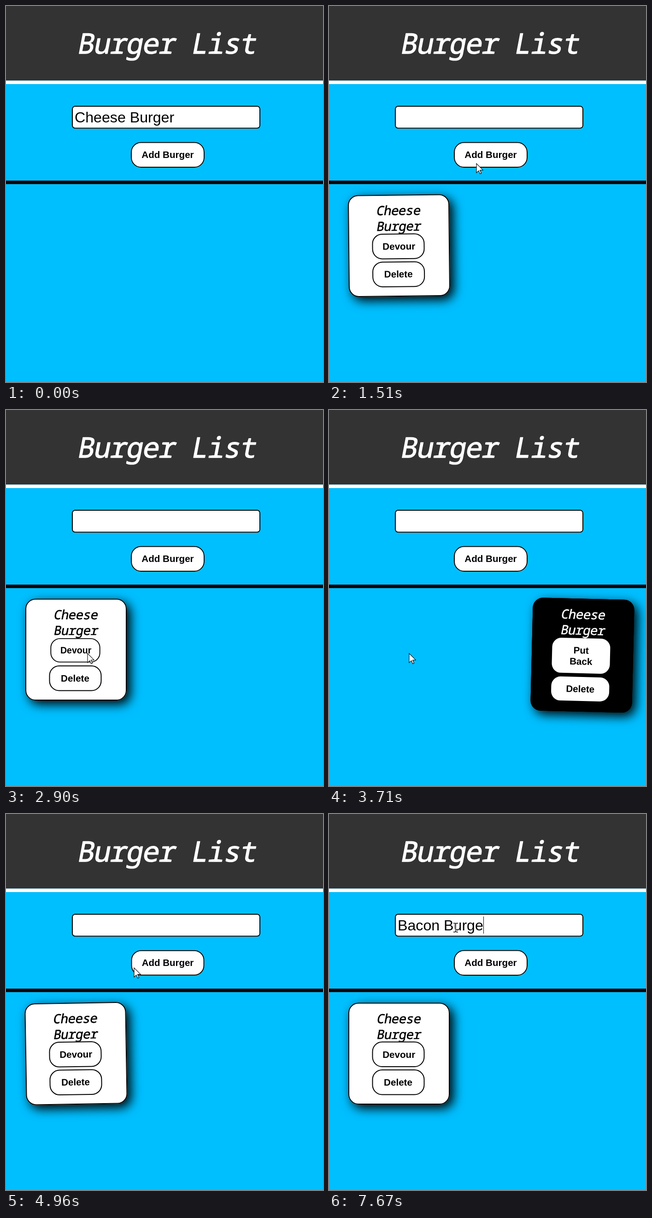
Write an HTML page with a canvas that moves like this. It is 688 px wide and 814 px high and loops after 8000 ms.

```html
<!DOCTYPE html>
<html lang="en">
<head>
<meta charset="utf-8">
<title>Burger List</title>
<style>
  html, body { margin: 0; width: 100%; height: 100%; overflow: hidden; background: #00bfff; }
  canvas { display: block; width: 688px; height: 814px; }
</style>
</head>
<body>
<canvas id="stage"></canvas>
<script>
const W = 688, H = 814, LOOP = 8000;
const SANS = '"Liberation Sans", Arial, sans-serif';
const MONO = '"Noto Sans Mono", "DejaVu Sans Mono", monospace';
const canvas = document.getElementById('stage');
const ctx = canvas.getContext('2d');
const dpr = window.devicePixelRatio || 1;
canvas.width = W * dpr;
canvas.height = H * dpr;

// moments at which the page reloads
const ADDED = 1510, DEVOURED = 3710, RETURNED = 4880;
const SETTLE = 350, HOVER = 210, SHRINK = 0.05;

// pointer trips; sag bows the trip downwards
const origin = { x: 444, y: 800 };
const trips = [
  { from: 180, to: 960, x: 286, y: 318 },
  { from: 1060, to: 1270, x: 320, y: 341 },
  { from: 1560, to: 1890, x: 267, y: 631 },
  { from: 2390, to: 2900, x: 177, y: 527 },
  { from: 3700, to: 3710, x: 174, y: 527 },
  { from: 3810, to: 4490, x: 527, y: 533, sag: 171 },
  { from: 4700, to: 4960, x: 278, y: 333 },
  { from: 4960, to: 5500, x: 275, y: 246 }
];

// typing comes in bursts at a steady pace
const PACE = 76;
const bursts = [['Bacon', 6320], [' ', 6800], ['B', 7020], ['ur', 7200], ['ger', 7520]];

const clamp = v => Math.max(0, Math.min(1, v));
const ramp = (t, from, len) => clamp((t - from) / len);
const smooth = p => p * p * (3 - 2 * p);
const hover = (t, arrive) => 1 - SHRINK * ramp(t, arrive - HOVER, HOVER);
const tilt = (t, from, angle) => angle * (1 - ramp(t, from, SETTLE));

function typedAt(t) {
  return bursts.map(([part, from]) =>
    t < from ? '' : part.slice(0, 1 + Math.floor((t - from) / PACE))).join('');
}

function pointerAt(t) {
  if (t < trips[0].from) return null;
  let { x, y } = origin;
  for (const trip of trips) {
    if (t < trip.from) break;
    const p = smooth(ramp(t, trip.from, trip.to - trip.from));
    x += (trip.x - x) * p;
    y += (trip.y - y) * p + (trip.sag || 0) * 4 * p * (1 - p);
  }
  return [x, y];
}

function box(x, y, w, h, r, fill, border) {
  ctx.beginPath();
  ctx.roundRect(x, y, w, h, r);
  ctx.fillStyle = fill;
  ctx.fill();
  if (!border) return;
  ctx.beginPath();
  ctx.roundRect(x + 1, y + 1, w - 2, h - 2, r - 1);
  ctx.lineWidth = 2;
  ctx.strokeStyle = '#000';
  ctx.stroke();
}

function label(text, x, y, font, color = '#000') {
  ctx.font = font;
  ctx.fillStyle = color;
  ctx.fillText(text, x, y);
}

// slanted monospace, thickened by an outline to a medium weight
function slanted(text, x, y, size, color) {
  ctx.save();
  ctx.translate(x, y);
  ctx.transform(1, 0, -0.19, 1, 0, 0);
  ctx.textAlign = 'center';
  ctx.letterSpacing = -size * 0.0216 + 'px';
  label(text, 0, 0, `${size}px ${MONO}`, color);
  ctx.lineWidth = size * 0.022;
  ctx.lineJoin = 'round';
  ctx.strokeStyle = color;
  ctx.strokeText(text, 0, 0);
  ctx.restore();
}

// lines: [text, centre x, baseline]
function button(x, y, w, h, border, scale, lines) {
  const cx = x + w / 2, cy = y + h / 2;
  ctx.save();
  ctx.translate(cx, cy);
  ctx.scale(scale, scale);
  ctx.translate(-cx, -cy);
  box(x, y, w, h, border ? 22 : 20, '#fff', border);
  ctx.textAlign = 'center';
  for (const [text, tx, ty] of lines) label(text, tx, ty, `bold 20.6px ${SANS}`);
  ctx.restore();
}

function card(x, h, dark, angle, buttons) {
  const y = 408.5, cx = x + 110, cy = y + h / 2;
  const ink = dark ? '#fff' : '#000';
  ctx.save();
  ctx.translate(cx, cy);
  ctx.rotate(angle * Math.PI / 180);
  ctx.translate(-cx, -cy);
  ctx.save();
  ctx.shadowColor = '#000';
  ctx.shadowBlur = 23 * dpr;
  ctx.shadowOffsetX = ctx.shadowOffsetY = 8 * dpr;
  box(x, y, 220, h, 22, '#000');
  ctx.restore();
  box(x, y, 220, h, 22, dark ? '#000' : '#fff', true);
  slanted('Cheese', cx - 1.7, 452.5, 27.6, ink);
  slanted('Burger', cx - 1.7, 486.5, 27.6, ink);
  buttons();
  ctx.restore();
}

function whiteCard(angle, scale) {
  card(42, 220.5, false, angle, () => {
    button(93.5, 492.5, 114, 55.5, true, scale, [['Devour', 151.7, 527.5]]);
    button(93.5, 553, 114, 55.5, true, 1, [['Delete', 150, 587.5]]);
  });
}

function blackCard(angle, scale) {
  card(440, 244.5, true, angle, () => {
    button(484, 494, 126, 76, false, scale, [['Put', 547, 527.5], ['Back', 547, 551.5]]);
    button(484, 578, 126, 52, false, 1, [['Delete', 547, 611]]);
  });
}

function band(y, h, color) {
  ctx.fillStyle = color;
  ctx.fillRect(0, y, W, h);
}

function page() {
  band(0, H, '#00bfff');
  band(0, 161.5, '#333');
  band(161.5, 7.5, '#fff');
  band(378, 7.5, '#000');
  slanted('Burger List', 347, 103, 61, '#fff');
}

function field(t) {
  box(143, 216, 409, 49.5, 7, '#fff', true);
  const typed = typedAt(t);
  const text = t < ADDED ? 'Cheese Burger' : typed;
  label(text, 149, 252, `32.15px ${SANS}`);
  const caretOn = typed || (t >= 5440 && t < 5990);
  if (caretOn) ctx.fillRect(Math.round(149 + ctx.measureText(text).width), 222, 1, 37);
}

function addButton(t) {
  const brush = 0.4 * SHRINK * (ramp(t, 4935, 85) - ramp(t, 5020, 90));
  const scale = t < ADDED ? hover(t, 1270) : 1 - brush;
  button(271, 294.5, 160, 55.5, true, scale, [['Add Burger', 351, 329]]);
}

function arrow(x, y) {
  const pts = [[0, 0], [0, 17], [4, 13.2], [6.6, 19], [9, 18], [6.4, 12.2], [12, 12]];
  ctx.beginPath();
  for (const [px, py] of pts) ctx.lineTo(x + px * 1.18, y + py * 1.18);
  ctx.closePath();
  ctx.fillStyle = '#fff';
  ctx.fill();
  ctx.lineWidth = 1.1;
  ctx.strokeStyle = '#000';
  ctx.stroke();
}

function beam(x, y) {
  ctx.beginPath();
  for (const s of [-1, 1]) {
    ctx.moveTo(x - 5, y + s * 9.5);
    ctx.lineTo(x - 1.5, y + s * 9.5);
    ctx.lineTo(x, y + s * 8);
    ctx.lineTo(x + 1.5, y + s * 9.5);
    ctx.lineTo(x + 5, y + s * 9.5);
  }
  ctx.moveTo(x, y - 8);
  ctx.lineTo(x, y + 8);
  for (const [width, color] of [[3, '#fff'], [1.3, '#000']]) {
    ctx.lineWidth = width;
    ctx.strokeStyle = color;
    ctx.stroke();
  }
}

function draw(t) {
  ctx.setTransform(dpr, 0, 0, dpr, 0, 0);
  page();
  field(t);
  addButton(t);

  if (t >= RETURNED) whiteCard(tilt(t, RETURNED, -1.25), 1);
  else if (t >= DEVOURED) blackCard(tilt(t, DEVOURED, 1.4), hover(t, 4490));
  else if (t >= ADDED) whiteCard(tilt(t, ADDED, -0.6), hover(t, 2900));

  const at = pointerAt(t);
  if (at) (at[1] < 265 ? beam : arrow)(...at);
}

const start = performance.now();
function tick() {
  draw((performance.now() - start) % LOOP);
  requestAnimationFrame(tick);
}
tick();
</script>
</body>
</html>
```
